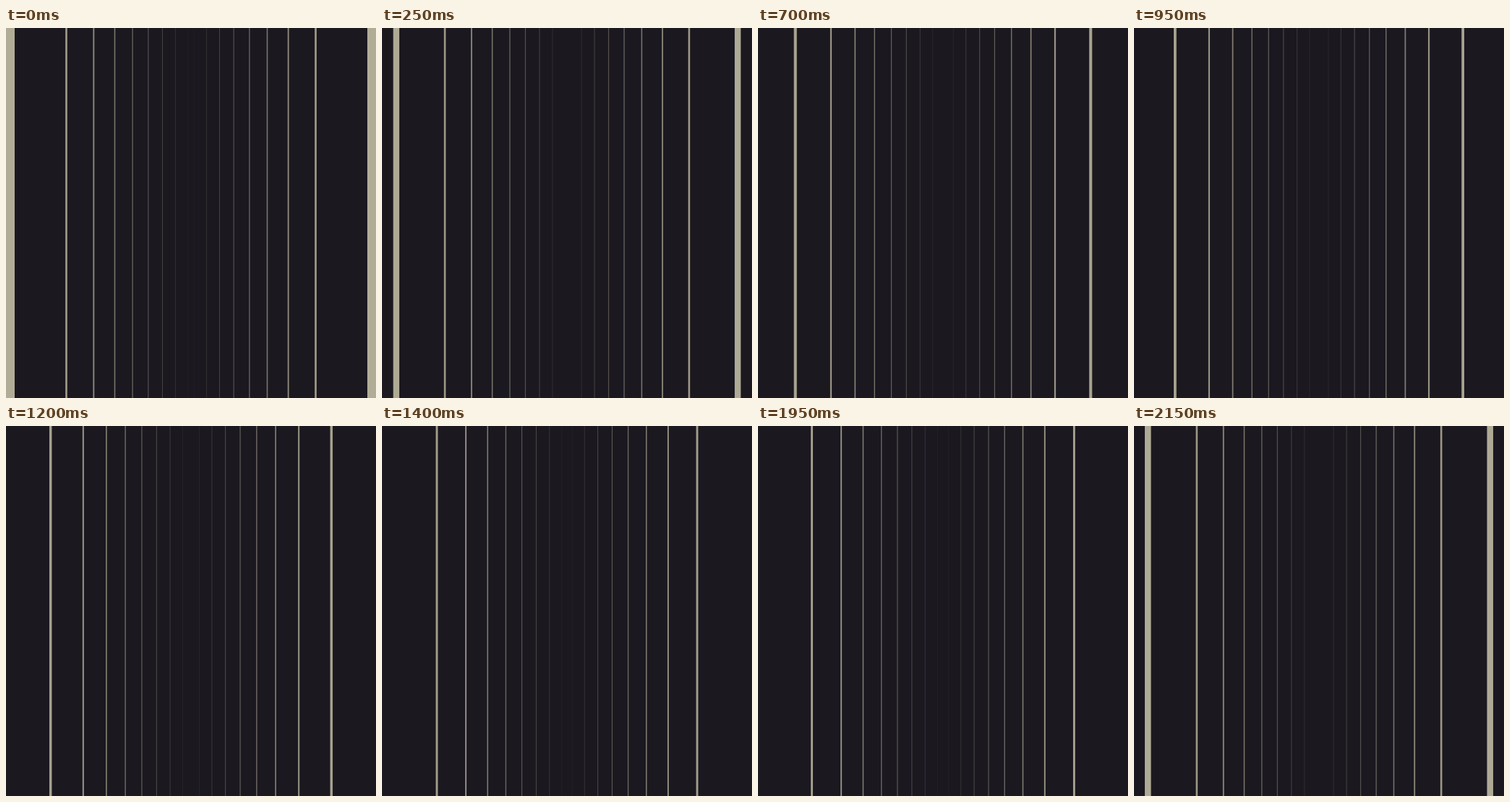
Animation of 512x512 px, one loop 2200 ms. Source, as an HTML page with a canvas:

```html
<!DOCTYPE html>
<html lang="en">
<head>
<meta charset="utf-8">
<title>Corridor</title>
<style>
  html, body { margin: 0; width: 100%; height: 100%; overflow: hidden; background: #1b1820; }
  canvas { display: block; width: 100vw; height: 100vh; }
</style>
</head>
<body>
<canvas id="stage" width="512" height="512"></canvas>
<script>
const ctx = document.getElementById('stage').getContext('2d');
const SIZE = 512, LOOP = 2200, STEP = 50;
const GAP = 8510;        // spacing of the bars before perspective
const HALF = 0.0294;     // half a bar, in spacings
const DEPTH = 8.31;      // spacings from the edge to the centre
const START = 0.0275, SPEED = 0.1843;

// Depth in spacings to distance from the stage edge.
const edge = d => Math.sqrt(Math.max(0, d * GAP)) - 10;

function draw(time) {
  const step = Math.floor((time % LOOP) / STEP);
  const raw = START - SPEED * step;
  const phase = raw - Math.floor(raw);

  ctx.globalAlpha = 1;
  ctx.fillStyle = '#1b1820';
  ctx.fillRect(0, 0, SIZE, SIZE);

  ctx.fillStyle = '#b2ad97';
  for (let d = phase - 1; d < DEPTH; d++) {
    const near = Math.max(0, edge(d - HALF));
    const width = edge(d + HALF) - near;
    if (width <= 0) continue;
    ctx.globalAlpha = Math.min(1, 1 - d / DEPTH);
    ctx.fillRect(near, 0, width, SIZE);
    ctx.fillRect(SIZE - near - width, 0, width, SIZE);
  }
}

const begin = performance.now();
function tick() {
  draw(performance.now() - begin);
  requestAnimationFrame(tick);
}
tick();
</script>
</body>
</html>
```
